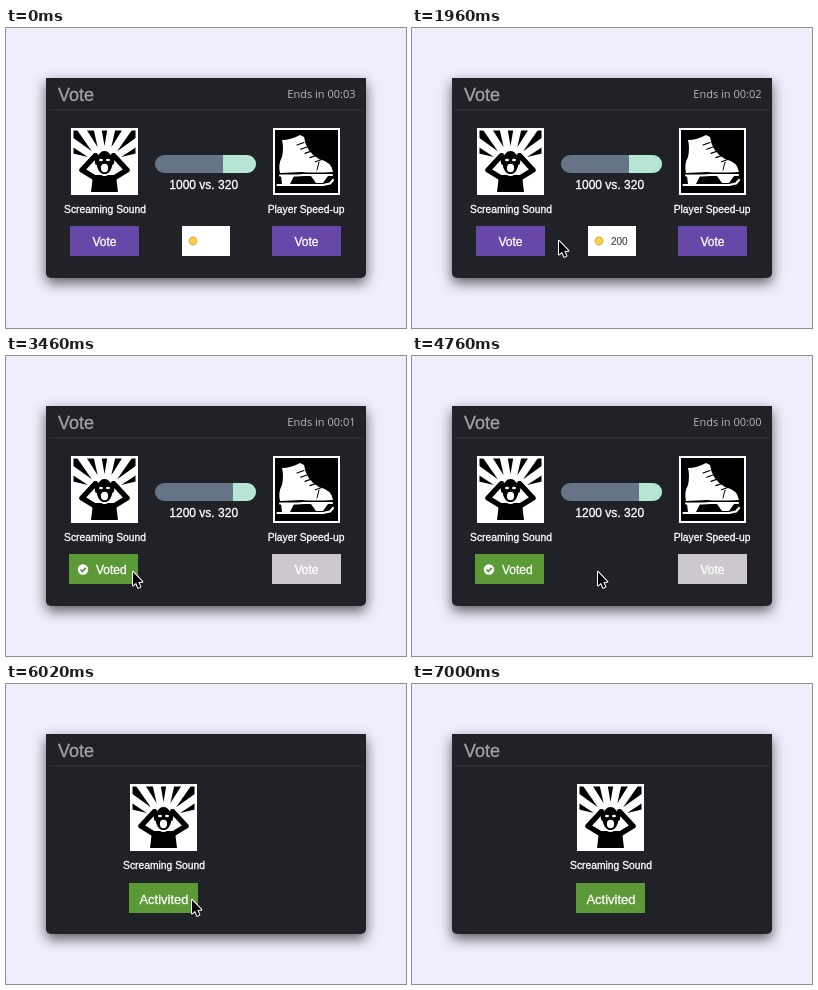
An HTML page with a canvas that plays this animation: 400x300 px, repeating every 7.04 s.

```html
<!DOCTYPE html>
<html lang="en">
<head>
<meta charset="utf-8">
<title>Vote</title>
<style>
  html, body { margin: 0; width: 100%; height: 100%; overflow: hidden; background: #efeefd; }
  canvas { display: block; width: 400px; height: 300px; }
</style>
</head>
<body>
<canvas id="stage" width="400" height="300"></canvas>
<script>
const ctx = document.getElementById('stage').getContext('2d');
const LOOP = 7040;
const SANS = '"Liberation Sans", Arial, sans-serif';
const PURPLE = [103, 71, 167], GREEN = [91, 154, 55], GREY = [204, 200, 206];
const PANEL = '#212227';

// Cursor tip: [time, x, y]; it rests between equal neighbours.
const PATH = [
  [730, 108, 32], [1180, 226, 220], [1320, 240, 214], [1790, 240, 214],
  [2060, 108, 213], [2180, 119, 216], [3410, 119, 216], [3640, 186, 216],
  [6530, 186, 216], [6990, 324, 31]
];

const clamp = v => Math.max(0, Math.min(1, v));
const lerp = (a, b, p) => a + (b - a) * p;
const mix = (a, b, p) => `rgb(${a.map((v, i) => Math.round(lerp(v, b[i], p)))})`;
const easeOut = p => 1 - (1 - p) ** 2;
const easeInOut = p => (1 - Math.cos(Math.PI * p)) / 2;
const glide = (t, start) => easeOut(clamp((t - start) / 350));

function rect(x, y, w, h, color) {
  ctx.fillStyle = color;
  ctx.fillRect(x, y, w, h);
}

function poly(points, color) {
  ctx.beginPath();
  points.forEach(([x, y]) => ctx.lineTo(x, y));
  ctx.closePath();
  ctx.fillStyle = color;
  ctx.fill();
}

function line(points, width, color) {
  ctx.beginPath();
  points.forEach(([x, y]) => ctx.lineTo(x, y));
  ctx.lineWidth = width;
  ctx.strokeStyle = color;
  ctx.stroke();
}

function oval(x, y, rx, ry, color) {
  ctx.beginPath();
  ctx.ellipse(x, y, rx, ry, 0, 0, Math.PI * 2);
  ctx.fillStyle = color;
  ctx.fill();
}

// A thin stroke turns the regular face into a medium one.
function text(str, x, y, size, { color = '#fff', align = 'center', bold = 0.3, font = SANS } = {}) {
  ctx.font = `${size}px ${font}`;
  ctx.textAlign = align;
  ctx.fillStyle = ctx.strokeStyle = color;
  ctx.fillText(str, x, y);
  if (bold) {
    ctx.lineWidth = bold;
    ctx.strokeText(str, x, y);
  }
}

function at(x, y, draw) {
  ctx.save();
  ctx.translate(x, y);
  ctx.lineJoin = ctx.lineCap = 'round';
  draw();
  ctx.restore();
}

function drawPanel() {
  rect(0, 0, 400, 300, '#efeefd');
  ctx.save();
  ctx.shadowColor = 'rgba(0,0,0,.62)';
  ctx.shadowBlur = 13;
  ctx.shadowOffsetY = 5;
  ctx.beginPath();
  ctx.roundRect(40, 50, 320, 200, [0, 0, 5, 5]);
  ctx.fillStyle = PANEL;
  ctx.fill();
  ctx.restore();
  rect(43, 81.5, 314, 1, '#36373c');
  text('Vote', 52, 73, 18, { color: '#a3a3a5', align: 'left' });
}

function drawTimer(t) {
  if (t >= 5560) return;
  const left = 3 - [1960, 3160, 4360].filter(s => t >= s).length;
  text('Ends in 00:0' + left, 349.5, 70, 11,
    { color: '#b9b9bb', align: 'right', bold: 0, font: '"Open Sans", "Noto Sans", sans-serif' });
}

function drawScreamer() {
  rect(0, 0, 67, 67, '#fff');
  ctx.save();
  ctx.beginPath();
  ctx.rect(2.5, 2.5, 62, 62);
  ctx.clip();
  for (let k = -3; k <= 3; k++) {
    const a = -Math.PI / 2 + k * 0.39;
    const ray = (r, d) => [33.5 + r * Math.cos(a + d), 36 + r * Math.sin(a + d)];
    poly([ray(18, 0), ray(60, -0.12), ray(60, 0.12)], '#000');
  }
  poly([[22, 47], [45, 47], [46, 56], [47, 64], [20, 64], [21, 56]], '#000');
  line([[24, 28], [11, 42], [24, 50]], 5.5, '#000');
  line([[43, 28], [56, 42], [43, 50]], 5.5, '#000');
  oval(33.5, 35, 9.5, 13, '#fff');
  oval(33.5, 34.5, 8, 11.5, '#000');
  line([[25, 27], [26, 35]], 4, '#000');
  line([[42, 27], [41, 35]], 4, '#000');
  oval(30, 32, 2, 1.3, '#fff');
  oval(37, 32, 2, 1.3, '#fff');
  oval(33.5, 40, 3.6, 4.2, '#fff');
  ctx.restore();
}

function drawSkate() {
  rect(0, 0, 67, 67, '#fff');
  rect(2, 2, 63, 63, '#000');
  ctx.beginPath();
  ctx.moveTo(9, 12);
  ctx.quadraticCurveTo(18, 12, 27, 7);
  ctx.lineTo(31, 9);
  ctx.quadraticCurveTo(33, 24, 46, 31);
  ctx.quadraticCurveTo(59, 34, 60, 44);
  ctx.quadraticCurveTo(40, 45, 28, 44);
  ctx.lineTo(7, 45);
  ctx.quadraticCurveTo(5, 36, 9, 29);
  ctx.quadraticCurveTo(11, 20, 9, 12);
  ctx.fillStyle = '#fff';
  ctx.fill();
  for (let i = 0; i < 5; i++) {
    const x = 24 + i * 3.4 + i * i * 0.3, y = 16 + i * 4.2;
    line([[x, y + 1], [x + 7, y - 1.5]], 1.2, '#000');
  }
  line([[46, 34], [44, 42]], 1, '#000');
  line([[7, 47.5], [24, 47.5], [31, 47], [59, 47]], 2, '#fff');
  poly([[8, 48], [21, 48], [17, 56], [9, 56]], '#fff');
  poly([[38, 48], [55, 48], [50, 55], [43, 55]], '#fff');
  line([[4.5, 57], [50, 57], [57, 55.5], [60, 52]], 2.2, '#fff');
}

function drawCheck(x, y, color) {
  oval(x, y, 5.2, 5.2, '#fff');
  line([[x - 2.5, y], [x - 0.7, y + 1.9], [x + 2.7, y - 1.7]], 1.7, color);
}

function drawSound(t) {
  const vote = glide(t, 2315), go = glide(t, 5895);
  const shift = Math.round(100 * go);
  at(65 + shift, 100, drawScreamer);
  text('Screaming Sound', 99 + shift, 185, 10.3);

  const x = Math.round(lerp(64, 63, vote) + 101 * go);
  const y = Math.round(198 + go);
  const color = mix(PURPLE, GREEN, vote);
  rect(x, y, 69, 30, color);
  if (t >= 5900) {
    text('Activited', x + 35, y + 20.5, 13);
  } else if (t >= 2320) {
    drawCheck(x + 14, y + 15.5, color);
    text('Voted', x + 27, y + 20, 12, { align: 'left' });
  } else {
    text('Vote', x + 34.5, y + 20, 12);
  }
}

function drawRival(t) {
  at(267, 100, drawSkate);
  text('Player Speed-up', 300, 185, 10.3);
  rect(266, 198, 69, 30, mix(PURPLE, GREY, glide(t, 2315)));
  text('Vote', 300.5, 218, 12);
}

function drawScore(t) {
  const split = lerp(217, 227, glide(t, 2315));
  ctx.save();
  ctx.beginPath();
  ctx.roundRect(149, 127, 101, 18, 9);
  ctx.clip();
  rect(149, 127, 101, 18, '#667488');
  rect(split, 127, 250 - split, 18, '#b6e7d5');
  ctx.restore();
  text((t < 2320 ? 1000 : 1200) + ' vs. 320', 197.7, 161, 12);
}

function drawStake(t) {
  rect(176, 198, 48, 30, '#fff');
  oval(187, 213, 4.4, 4.4, '#dda53a');
  oval(187, 213, 3.5, 3.5, '#fbd04c');
  if (t >= 1040) text('200', 199, 217, 10, { color: '#444', align: 'left', bold: 0.15 });
}

function drawCursor(t) {
  const i = PATH.findIndex(key => key[0] > t);
  if (i < 1) return;
  const [t0, x0, y0] = PATH[i - 1], [t1, x1, y1] = PATH[i];
  const p = easeInOut((t - t0) / (t1 - t0));
  ctx.save();
  ctx.beginPath();
  ctx.rect(40, 50, 320, 200);
  ctx.clip();
  at(Math.round(lerp(x0, x1, p)), Math.round(lerp(y0, y1, p)), () => {
    const arrow = [[0, 0], [0, 13.5], [3.1, 10.8], [5.2, 15.8], [7.4, 14.9], [5.3, 10], [9.3, 9.7], [0, 0]];
    line(arrow, 2, '#fff');
    poly(arrow, '#000');
  });
  ctx.restore();
}

function frame(now) {
  const t = now % LOOP;
  drawPanel();
  drawTimer(t);
  if (t < 5900) {
    drawScore(t);
    drawRival(t);
  }
  if (t < 2320) drawStake(t);
  drawSound(t);
  drawCursor(t);
  requestAnimationFrame(draw);
}

const start = performance.now();
function draw() {
  frame(performance.now() - start);
}
draw();
</script>
</body>
</html>
```
